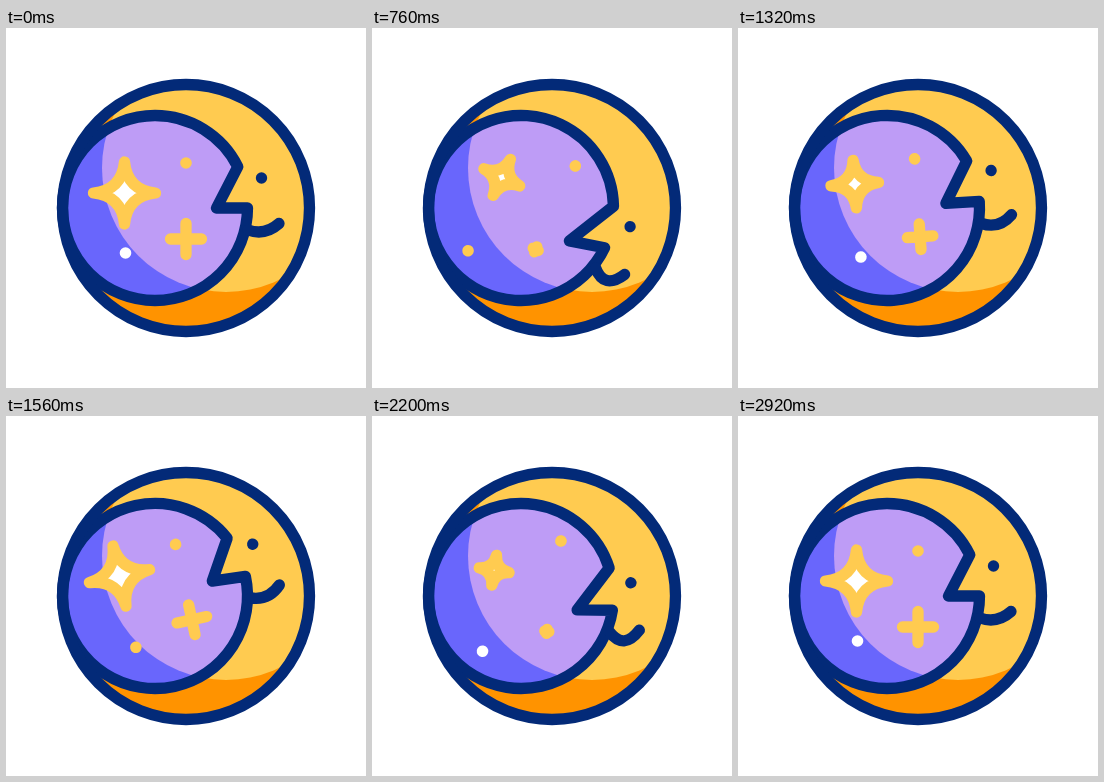
These frames come from a looping animation (360 px wide and 360 px high, 3 s). An HTML page with a canvas:

```html
<!DOCTYPE html>
<html lang="en">
<head>
<meta charset="utf-8">
<title>Moon and stars</title>
<style>
  html, body { margin: 0; width: 100%; height: 100%; overflow: hidden; background: #fff; }
  canvas { display: block; width: 360px; height: 360px; }
</style>
</head>
<body>
<canvas id="stage" width="360" height="360"></canvas>
<script>
const ctx = document.getElementById('stage').getContext('2d');
const NAVY = '#032a78', GOLD = '#ffcb50', AMBER = '#ff9300', LILAC = '#be9cf6', INDIGO = '#6966fc';
const LOOP = 3000, STEP = 40, START = 200, END = 2900, PULSE = 1240;
const CX = 149, CY = 180, R = 92.5, RAD = Math.PI / 180;

// The head swings from each angle (degrees) to the next one.
const swing = [[START, 0], [780, 25.5], [1560, -12.2], [2140, 9], [END, 0]];

// Rises from 0 to 1 and falls back while x goes from 0 to 1.
const wave = x => (1 - Math.cos(2 * Math.PI * x)) / 2;

// Two equal waves, the first one beginning at the given time.
function pulse(t, begin) {
  const x = (t - begin) / PULSE;
  return x > 0 && x < 2 ? wave(x) : 0;
}

function swingAngle(t) {
  const i = swing.findIndex(([time]) => time > t);
  if (i < 1) return 0;
  const [t0, a0] = swing[i - 1], [t1, a1] = swing[i];
  return a0 + (a1 - a0) * wave((t - t0) / (t1 - t0) / 2);
}

function circle(x, y, r) {
  const path = new Path2D();
  path.arc(x, y, r, 0, 2 * Math.PI);
  return path;
}

function fill(path, color) {
  ctx.fillStyle = color;
  ctx.fill(path);
}

function stroke(path, color) {
  ctx.strokeStyle = color;
  ctx.stroke(path);
}

const disc = circle(180, 180, 123.5);
const light = circle(220, 140, 124);

function shaded(shape, bright, dark) {
  ctx.save();
  ctx.clip(shape);
  ctx.fillStyle = dark;
  ctx.fillRect(0, 0, 360, 360);
  fill(light, bright);
  ctx.restore();
}

// The night sky: a circle with the nose cut into it.
function skyPath(turn, x, y) {
  const c = Math.cos(turn), s = Math.sin(turn);
  const path = new Path2D();
  path.arc(CX, CY, R, turn, turn + 333.5 * RAD);
  path.lineTo(CX + x * c - y * s, CY + x * s + y * c);
  path.closePath();
  return path;
}

function starPath(x, y, size) {
  const path = new Path2D(), bend = size * 0.09;
  path.moveTo(x, y - size);
  for (let i = 0; i < 4; i++) {
    const a = i * Math.PI / 2, c = Math.cos(a), s = Math.sin(a);
    path.quadraticCurveTo(x + bend * (c + s), y + bend * (s - c), x + size * c, y + size * s);
  }
  path.closePath();
  return path;
}

function draw(t) {
  const degrees = swingAngle(t), turn = degrees * RAD;
  const hump = t > START && t < END ? wave((t - START) / (END - START)) : 0;
  const beat = pulse(t, 220);
  const sky = skyPath(turn, 61.5 - 2.2 * hump - 3 * beat, 0.22 * degrees + 3.5 * beat);

  ctx.fillStyle = '#fff';
  ctx.fillRect(0, 0, 360, 360);
  ctx.lineWidth = 11.3;
  ctx.lineCap = ctx.lineJoin = 'round';

  shaded(disc, GOLD, AMBER);
  shaded(sky, LILAC, INDIGO);
  stroke(sky, NAVY);
  stroke(disc, NAVY);

  ctx.save();
  ctx.translate(CX, CY);
  ctx.rotate(turn);

  // Face
  fill(circle(106.5, -30, 5.7), NAVY);
  stroke(new Path2D(`M93 22Q110 ${28 + 11 * beat} ${124 - 2 * beat} 15.5`), NAVY);

  // Big star and plus
  const star = starPath(-30.5, -15 - 12 * hump, 31 - 16 * pulse(t, 370));
  fill(star, '#fff');
  stroke(star, GOLD);
  const arm = 15.5 - 14 * pulse(t, 260);
  stroke(new Path2D(`M${31 - arm} 31h${2 * arm}M31 ${31 - arm}v${2 * arm}`), GOLD);

  // Small stars drift apart, the lower one blinks
  const drift = 17 * beat;
  fill(circle(31, -45 - drift, 5.8), GOLD);
  fill(circle(-29.5, 45 + drift, 5.8), t % 800 > 600 ? GOLD : '#fff');
  ctx.restore();
}

function tick() {
  const t = performance.now() % LOOP;
  draw(Math.floor(t / STEP) * STEP);
  requestAnimationFrame(tick);
}
tick();
</script>
</body>
</html>
```
